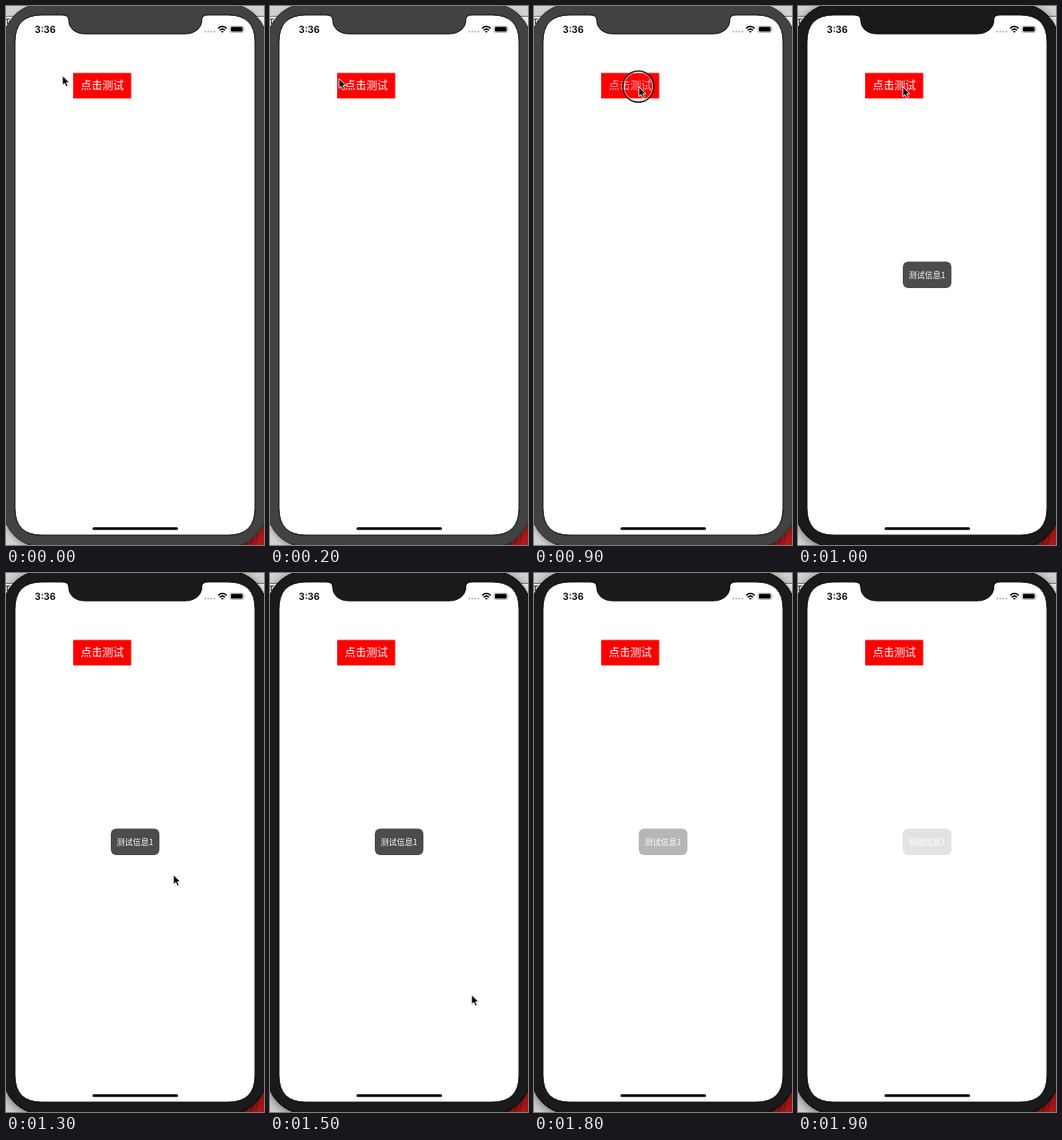
These frames come from a looping animation (288 px wide and 600 px high, 2 s). An HTML page:

```html
<!DOCTYPE html>
<html lang="zh-CN">
<head>
<meta charset="utf-8">
<title>点击测试</title>
<style>
  html, body { margin: 0; width: 100%; height: 100%; overflow: hidden; background: #d2d2d2; }
  svg { display: block; width: 100vw; height: 100vh; }
  .cjk { font-family: "Noto Sans CJK SC", "Noto Sans CJK", sans-serif; fill: #fff; }
  .clock { font: 600 10.5px Inter, sans-serif; }
</style>
</head>
<body>
<svg viewBox="0 0 288 600">
  <defs>
    <filter id="blur" x="-20%" y="-20%" width="140%" height="140%">
      <feGaussianBlur id="spread" stdDeviation="3"/>
    </filter>
    <linearGradient id="red" x1="0" x2="1">
      <stop offset="0" stop-color="#6d1010"/>
      <stop offset="1" stop-color="#b01616"/>
    </linearGradient>
  </defs>

  <!-- desktop behind the phone -->
  <rect width="288" height="600" fill="#d2d2d2"/>
  <rect y="12" width="288" height="18" fill="#f2f2f2"/>
  <path d="M0 11.5H288" stroke="#777"/>
  <path d="M0 14.5H4M1.5 14.5V20" stroke="#444" fill="none"/>
  <rect x="250" y="560" width="38" height="40" fill="url(#red)"/>
  <path d="M276 600L279 588M282 600L285 582M270 600L272 594" stroke="#d03030" stroke-width=".7"/>
  <rect id="shadow" x="-3" y="0" width="294" height="604" rx="43" opacity=".4" filter="url(#blur)"/>

  <!-- phone -->
  <rect id="body" x="-3" y="-2" width="294" height="604" rx="43" stroke-width="1.2"/>
  <path d="M40 10H63Q70 10 70 16C70 25 78 31 88 31H200C210 31 218.500 25 218.500 16Q218.500 10 225 10H248Q278 10 278 40V559Q278 589 248 589H40Q10 589 10 559V40Q10 10 40 10Z"
        fill="#fff" stroke="#0a0a0a" stroke-width="1"/>

  <!-- status bar -->
  <text class="clock" x="32" y="30">3:36</text>
  <g fill="#b5b5b5">
    <circle cx="222.500" cy="28.500" r="1.100"/><circle cx="225.900" cy="28.500" r="1.100"/>
    <circle cx="229.300" cy="28.500" r="1.100"/><circle cx="232.700" cy="28.500" r="1.100"/>
  </g>
  <g fill="none" stroke="#000" stroke-width="1.500">
    <path d="M236.700 25Q241.500 20.600 246.300 25M238.500 27Q241.500 24.300 244.500 27"/>
    <path d="M241.500 29.800L239.900 28.300Q241.500 27 243.100 28.300Z" fill="#000" stroke="none"/>
  </g>
  <rect x="249.900" y="22.300" width="15.400" height="7.200" rx="2" fill="none" stroke="#999" stroke-width=".7"/>
  <rect x="251" y="23.300" width="13.200" height="5.200" rx="1.200"/>
  <path d="M266.300 24.700Q267.500 25.900 266.300 27.100Z" fill="#999"/>
  <rect x="96.500" y="580.300" width="95.500" height="3" rx="1.500"/>

  <!-- button -->
  <rect x="75" y="74.500" width="64.700" height="28.300" fill="#f00"/>
  <text id="label" class="cjk" x="83.500" y="93.200" font-size="12">点击测试</text>

  <!-- message -->
  <g id="toast">
    <rect x="117" y="284.500" width="54.300" height="29.500" rx="6" fill="#000" fill-opacity=".7"/>
    <text class="cjk" x="123.500" y="303" font-size="9">测试信息1</text>
  </g>

  <!-- pointer -->
  <g id="ring" fill="none">
    <circle cx="116.500" cy="89.700" r="16.300" stroke="#fff" stroke-width="1" stroke-opacity=".75"/>
    <circle cx="116.500" cy="89.700" r="17.300" stroke="#000" stroke-width="1.300"/>
  </g>
  <path id="cursor" d="M0 0V10.800L2.500 8.500L4.300 12.600L6.300 11.700L4.500 7.800H7.900Z"
        fill="#000" stroke="#fff" stroke-width=".9" stroke-linejoin="round"/>
</svg>
<script>
  const LOOP = 2000, STEP = 100;
  const $ = id => document.getElementById(id);
  const set = (id, attrs) => {
    for (const k in attrs) $(id).setAttribute(k, attrs[k]);
  };
  const clamp = x => Math.max(0, Math.min(1, x));
  const smooth = x => x * x * (3 - 2 * x);
  const mix = (a, b, k) => a + (b - a) * k;

  // start, end, from point, to point, easing
  const moves = [
    [0, 600, [63, 77.5], [117, 90], smooth],
    [1000, 1500, [117, 90], [225, 469.5], smooth],
    [1500, 1700, [225, 469.5], [260, 596], x => x]
  ];

  function pointer(t) {
    let p = moves[0][2];
    for (const [start, end, a, b, ease] of moves) {
      if (t < start) break;
      const k = ease(clamp((t - start) / (end - start)));
      p = [mix(a[0], b[0], k), mix(a[1], b[1], k)];
    }
    return p;
  }

  function toastAlpha(t) {
    if (t < 1000) return 0;
    return 1 - smooth(clamp((t - 1500) / 530));
  }

  function draw(time) {
    const t = Math.floor((time % LOOP) / STEP) * STEP;
    const active = t >= 1000, pressed = t === 900;
    const [x, y] = pointer(t);
    set("cursor", {
      transform: `translate(${x.toFixed(2)} ${y.toFixed(2)})`,
      visibility: t < 1800 ? "visible" : "hidden"
    });
    set("ring", { visibility: pressed ? "visible" : "hidden" });
    set("label", { "fill-opacity": pressed ? .7 : 1 });
    set("toast", { opacity: toastAlpha(t).toFixed(3) });
    set("body", {
      fill: active ? "#1a1a1a" : "#424242",
      stroke: active ? "#0c0c0c" : "#333"
    });
    set("shadow", { opacity: active ? .55 : .35 });
    set("spread", { stdDeviation: active ? 6 : 3 });
  }

  const origin = performance.now();
  function tick() {
    draw(performance.now() - origin);
    requestAnimationFrame(tick);
  }
  tick();
</script>
</body>
</html>
```
